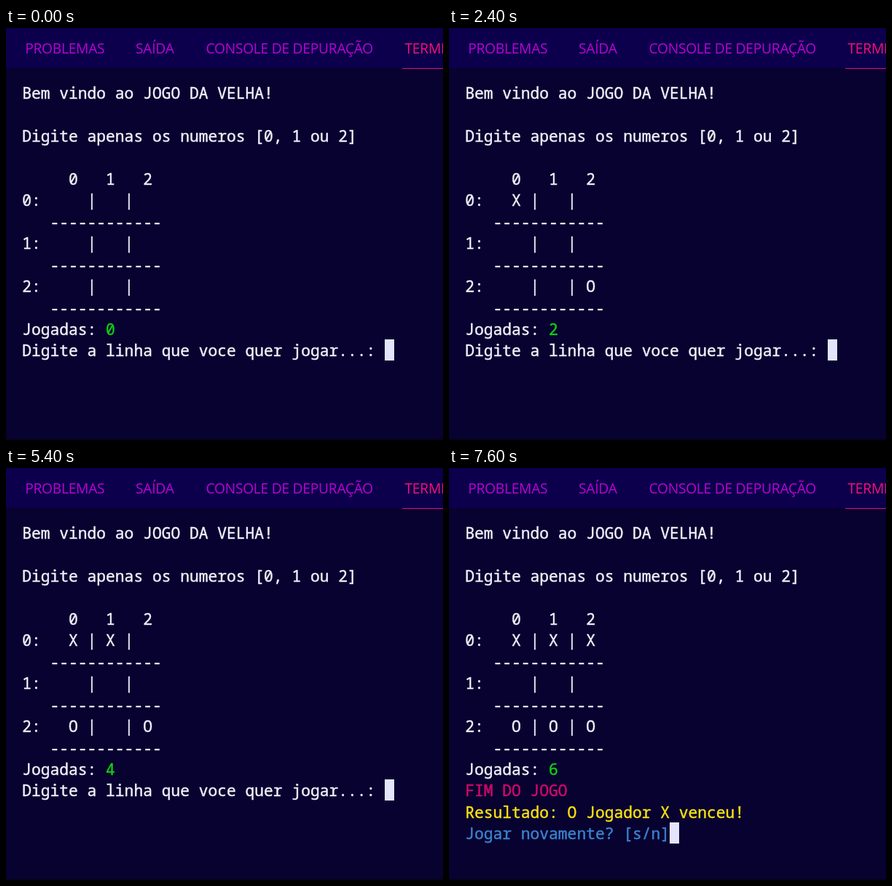
An HTML page with a canvas that plays this animation: 600 by 565 pixels, repeating every 8000 ms.

```html
<!DOCTYPE html>
<html lang="pt">
<head>
<meta charset="utf-8">
<title>Jogo da velha</title>
<style>
html, body { margin: 0; width: 100%; height: 100%; overflow: hidden; background: #080230; }
canvas { display: block; }
</style>
</head>
<body>
<canvas id="stage" width="600" height="565"></canvas>
<script>
const ctx = document.getElementById('stage').getContext('2d');
const LOOP = 8000, LEFT = 22.2, TOP = 74.3, CELL = 12.765, LINE = 29.43;
const WHITE = '#f1f1fb', GREEN = '#12cf12', PINK = '#d3086c', YELLOW = '#fbe312', BLUE = '#3b83cf';
const ROW = 'Digite a linha que voce quer jogar...: ';
const COL = 'Digite a coluna que voce quer jogar...: ';

// start time, moves played, prompt lines
const steps = [
  [0, 0, [ROW]],
  [1000, 0, [ROW + '0']],
  [1200, 0, [ROW + '0', COL]],
  [1600, 0, [ROW + '0', COL + '0']],
  [1800, 2, [ROW]],
  [4600, 2, [ROW + '0']],
  [4800, 2, [ROW + '0', COL]],
  [5000, 2, [ROW + '0', COL + '1']],
  [5200, 4, [ROW]],
  [6600, 4, [ROW + '0', COL]],
  [7200, 4, [ROW + '0', COL + '2']],
  [7400, 6, ['FIM DO JOGO', 'Resultado: O Jogador X venceu!', 'Jogar novamente? [s/n]']]
];
const moves = [0, 8, 1, 6, 2, 7]; // board cells, X and O in turn

function rect(x, y, w, h, color) {
  ctx.fillStyle = color;
  ctx.fillRect(x, y, w, h);
}

// The thin outline gives the glyphs a medium weight.
function print(text, row, col = 0, color = WHITE) {
  ctx.font = '21.25px "Noto Sans Mono", "DejaVu Sans Mono", monospace';
  ctx.fillStyle = ctx.strokeStyle = color;
  ctx.lineWidth = 0.45;
  [...text].forEach((c, i) => {
    const x = LEFT + (col + i) * CELL, y = TOP + 23 + row * LINE;
    ctx.fillText(c, x, y);
    ctx.strokeText(c, x, y);
  });
}

function tabs() {
  rect(0, 0, 600, 55, '#0c004d');
  ctx.font = '19.2px "Open Sans", "Noto Sans", sans-serif';
  ctx.letterSpacing = '-0.25px';
  ctx.fillStyle = '#bb03d4';
  ctx.fillText('PROBLEMAS', 26.2, 35);
  ctx.fillText('SAÍDA', 178, 35);
  ctx.fillText('CONSOLE DE DEPURAÇÃO', 274.5, 35);
  ctx.fillStyle = '#f80f74';
  ctx.fillText('TERMINAL', 547.5, 35);
  ctx.letterSpacing = '0px';
  rect(544, 55, 56, 1, '#e00d72');
}

function board(count) {
  print('0   1   2', 4, 5);
  for (let r = 0; r < 3; r++) {
    print(r + ':     |   |', 5 + 2 * r);
    print('-'.repeat(12), 6 + 2 * r, 3);
  }
  moves.slice(0, count).forEach((cell, i) =>
    print('XO'[i % 2], 5 + 2 * Math.floor(cell / 3), 5 + 4 * (cell % 3)));
  print('Jogadas:', 11);
  print(String(count), 11, 9, GREEN);
}

function draw(time) {
  const [, count, lines] = steps.findLast(s => s[0] <= time);
  rect(0, 0, 600, 565, '#080230');
  tabs();
  print('Bem vindo ao JOGO DA VELHA!', 0);
  print('Digite apenas os numeros [0, 1 ou 2]', 2);
  board(count);
  const colors = count === 6 ? [PINK, YELLOW, BLUE] : [WHITE, WHITE];
  lines.forEach((text, i) => print(text, 12 + i, 0, colors[i]));
  const last = lines.length - 1;
  rect(Math.round(LEFT + lines[last].length * CELL), Math.round(TOP + (12 + last) * LINE), 13, 29, '#e3e5fb');
  rect(0, 563, 600, 2, '#06011f');
}

function frame(now) {
  draw(now % LOOP);
  requestAnimationFrame(frame);
}
requestAnimationFrame(frame);
</script>
</body>
</html>
```
